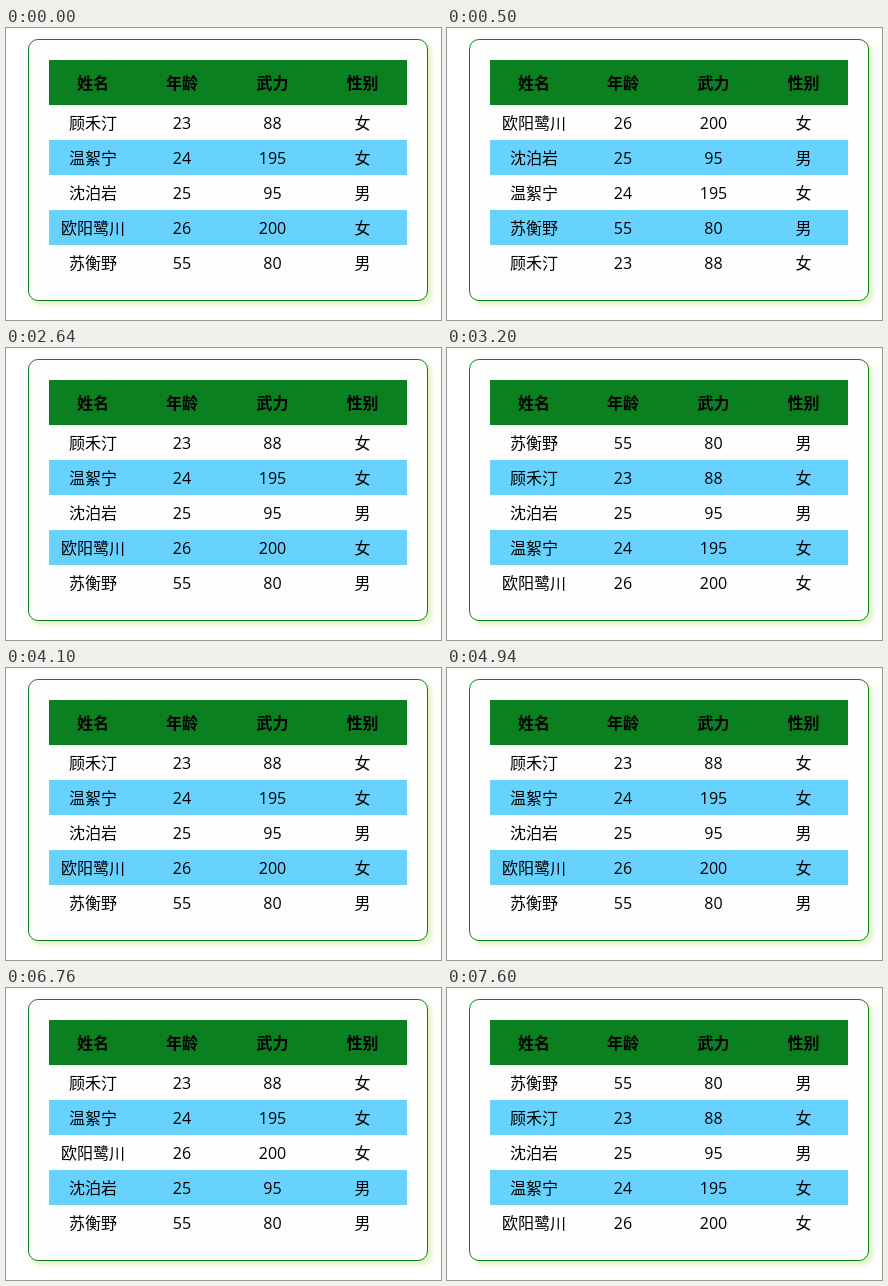
Recreate the animation shown at these times as an HTML page. Size 435 by 292 pixels, loop 8 s.

```html
<!DOCTYPE html>
<html lang="zh-CN">
<head>
<meta charset="utf-8">
<title>排序表格</title>
<style>
  html, body { margin: 0; width: 100%; height: 100%; overflow: hidden; background: #fff; }
  .card {
    position: absolute; left: 22px; top: 11px; width: 400px; height: 262px;
    box-sizing: border-box; border: 1px solid #0a8020; border-radius: 10px;
    background: #fefefe; box-shadow: 4px 4px 5px #e4f2c4;
  }
  svg { position: absolute; left: 0; top: 0; }
  text {
    font: 16px "Open Sans", "Noto Sans CJK SC", "Noto Sans CJK", sans-serif;
    text-anchor: middle; fill: #000;
  }
  .word { font-family: "Noto Sans CJK SC", "Noto Sans CJK", sans-serif; font-weight: 350; }
  .head { font-weight: 700; }
</style>
</head>
<body>
<div class="card"></div>
<svg width="435" height="292">
  <rect x="43" y="32" width="358" height="45" fill="#0a8020"/>
  <rect x="43" y="112" width="358" height="35" fill="#67d2fd"/>
  <rect x="43" y="182" width="358" height="35" fill="#67d2fd"/>
</svg>
<script>
const LOOP = 8000, NAME = 0, AGE = 1, POWER = 2, SEX = 3;
const columns = [87, 176, 266.5, 356.5];
const people = [
  ["顾禾汀", 23, 88, "女"],
  ["温絮宁", 24, 195, "女"],
  ["沈泊岩", 25, 95, "男"],
  ["欧阳鹭川", 26, 200, "女"],
  ["苏衡野", 55, 80, "男"]
];
// [start time, sort column]
const steps = [[0, AGE], [500, NAME], [1800, AGE], [3200, POWER],
               [4100, AGE], [5500, SEX], [7600, POWER]];
const svg = document.querySelector("svg");

function addRow(y, classes) {
  return columns.map((x, i) => {
    const cell = document.createElementNS(svg.namespaceURI, "text");
    cell.setAttribute("x", x);
    cell.setAttribute("y", y);
    cell.setAttribute("class", classes[i]);
    return svg.appendChild(cell);
  });
}

function fill(cells, values) {
  cells.forEach((cell, i) => cell.textContent = values[i]);
}

// Ties keep their age order because sorting is stable.
function sortBy(key) {
  return [...people].sort((a, b) => (a[key] > b[key]) - (a[key] < b[key]));
}

fill(addRow(61, columns.map(() => "head")), ["姓名", "年龄", "武力", "性别"]);
const rows = people.map((_, i) => addRow(101 + 35 * i, ["word", "", "", "word"]));

let shown;
function draw(time) {
  const key = steps.filter(([start]) => start <= time).pop()[1];
  if (key !== shown) {
    sortBy(key).forEach((person, i) => fill(rows[i], person));
    shown = key;
  }
}

const begin = performance.now();
function frame(now) {
  draw(Math.max(0, now - begin) % LOOP);
  requestAnimationFrame(frame);
}
frame(begin);
</script>
</body>
</html>
```
